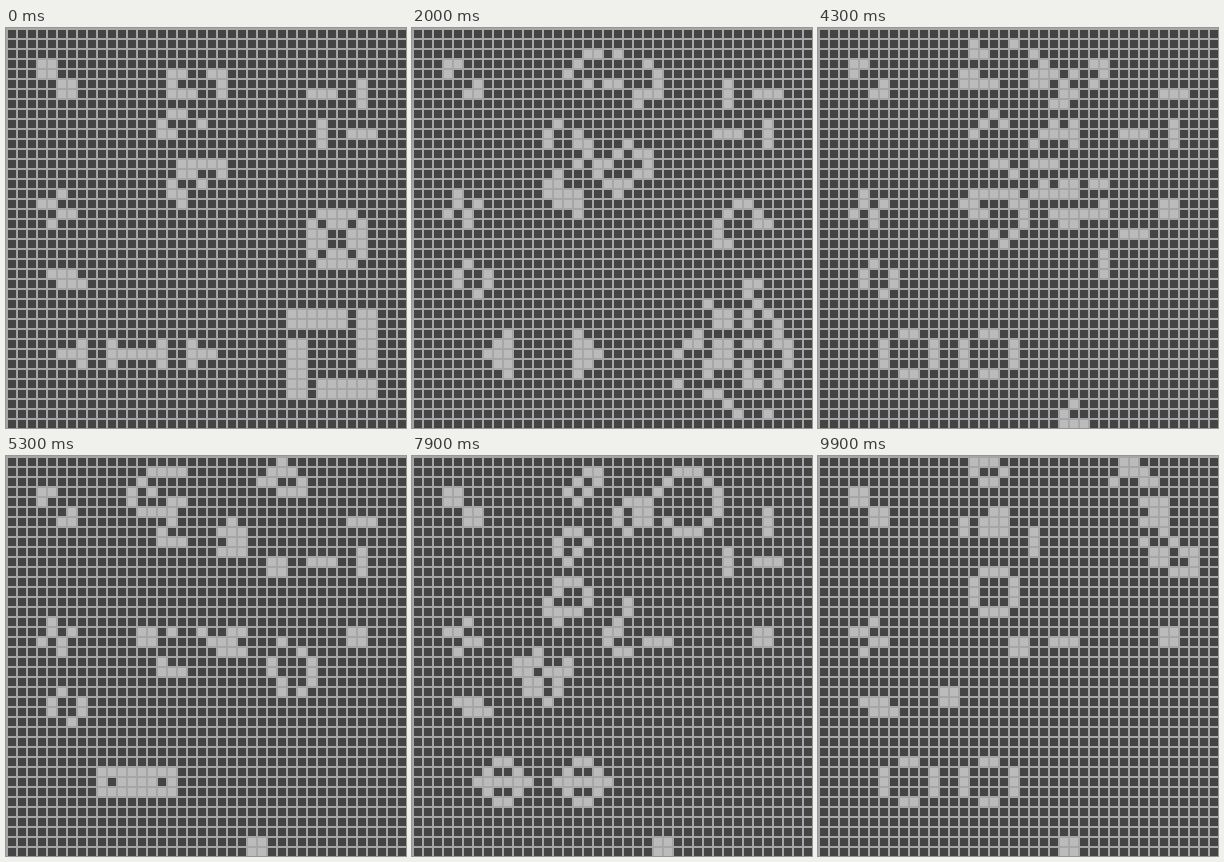
Recreate the animation shown at these times as an HTML page with a canvas. Size 400 px wide and 400 px high, loop 10 s.

```html
<!DOCTYPE html>
<html lang="en">
<head>
<meta charset="utf-8">
<title>Game of Life</title>
<style>
html, body { margin: 0; height: 100%; overflow: hidden; background: #444; }
canvas { display: block; }
</style>
</head>
<body>
<canvas width="400" height="400"></canvas>
<script>
const SIZE = 40, CELL = 10, LOOP = 10000, TICK = 100, FIRST = 8;
// Ticks after the first step on which the board rests.
const RESTS = [10, 15, 21, 25, 30, 35, 40, 45, 52, 57, 60, 65, 70, 77, 80, 85, 90, 95];

// Starting patterns: column, row, then the rows of cells.
const PATTERNS = [
  [3, 3, 'OO/OO/..OO/..OO'],
  [3, 16, '..O/OO/..OO/.O'],
  [4, 24, 'OOO/.OOO'],
  [5, 31, '..O..O....O..O/OOO..OOOOOO..OOO/..O..O....O..O'],
  [30, 5, '.....O/OOO..O/.....O'],
  [31, 9, 'O/O..OOO/O'],
  [30, 18, '.OOOO/O.OO.O/OO..OO/OO..OO/O.OO.O/.OOOO'],
  [28, 28, 'OOOOOO.OO/OOOOOO.OO/.......OO/OO.....OO/OO.....OO/OO.....OO/OO/OO.OOOOOO/OO.OOOOOO'],
  [15, 4, '.OO..OO/.O....O/.OOO..O//.OO/O...O/OO'],
  [16, 13, '.OOOOO/.OO..O/O..O/OO/.O'],
];

const ctx = document.querySelector('canvas').getContext('2d');

function seed() {
  const board = new Uint8Array(SIZE * SIZE);
  for (const [col, row, text] of PATTERNS)
    text.split('/').forEach((line, y) => [...line].forEach((c, x) => {
      if (c === 'O') board[(row + y) * SIZE + col + x] = 1;
    }));
  return board;
}

function next(board) {
  const at = (x, y) => x >= 0 && y >= 0 && x < SIZE && y < SIZE ? board[y * SIZE + x] : 0;
  return board.map((alive, i) => {
    const x = i % SIZE, y = (i - x) / SIZE;
    let n = -alive;
    for (let dy = -1; dy <= 1; dy++)
      for (let dx = -1; dx <= 1; dx++) n += at(x + dx, y + dy);
    return n === 3 || (alive && n === 2) ? 1 : 0;
  });
}

const steps = Array.from({ length: LOOP / TICK - FIRST }, (_, i) => i + FIRST)
  .filter(tick => !RESTS.includes(tick));
const boards = [seed()];
for (const _ of steps) boards.push(next(boards.at(-1)));

function draw() {
  const tick = Math.floor((performance.now() + 10) % LOOP / TICK);
  const board = boards[steps.filter(s => s <= tick).length];
  ctx.fillStyle = '#a6a6a6';
  ctx.fillRect(0, 0, 400, 400);
  board.forEach((alive, i) => {
    ctx.fillStyle = alive ? '#bbb' : '#444';
    ctx.fillRect(i % SIZE * CELL + 2, Math.floor(i / SIZE) * CELL + 2, 8, 8);
  });
  requestAnimationFrame(draw);
}
draw();
</script>
</body>
</html>
```
